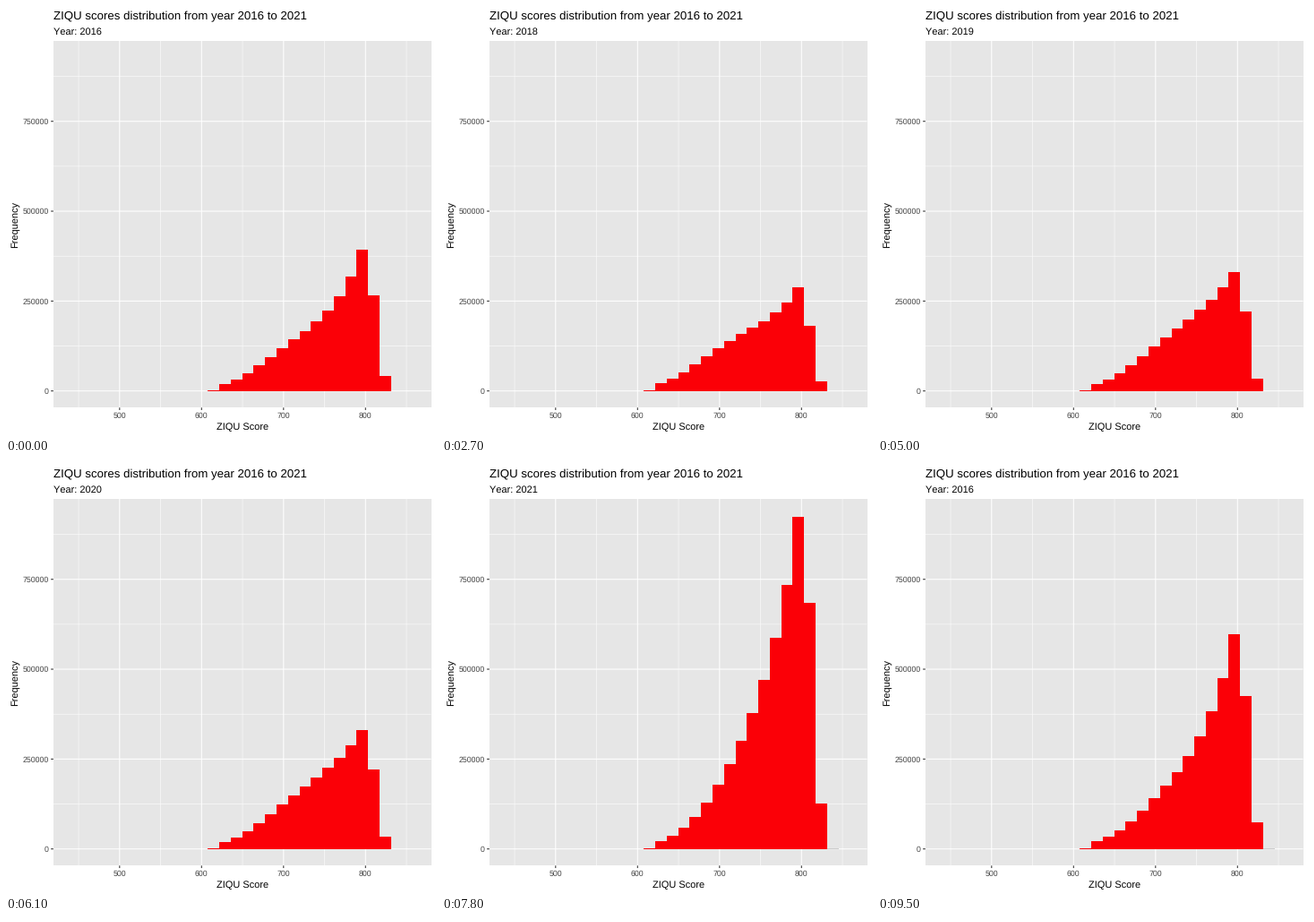
Animation of 480x480 px, one loop 10 s. Source, as a matplotlib script:

```python
import matplotlib.pyplot as plt
import numpy as np
from matplotlib.animation import FuncAnimation
from matplotlib.patches import Rectangle

SIZE, DPI = 480, 72
STEP = 100                 # ms per frame
LOOP = 10000               # ms
HOLD = 1700                # ms per year
LEFT, RIGHT, TOP, BOTTOM = 52.9, 474.5, 38.9, 448.3
ZERO = 430
EDGES = np.round(225.35 + 12.78 * np.arange(18))

# Per year: plateau height, extra height at the peak, decay per bin
# going left from the peak
YEARS = {
    2016: (60, 100, 0.70),
    2017: (64, 53, 0.70),
    2018: (60, 38, 0.70),
    2019: (54, 80, 0.80),
    2020: (50, 325, 0.77),
    2021: (58, 184, 0.74),
}

plt.rcParams.update({
    "font.family": "Liberation Sans",
    "text.hinting": "none",
    "text.hinting_factor": 8,
    "text.kerning_factor": 6,
})


def bar_heights(plateau, spike, decay):
    """Logistic rise times a peak that decays to the left, then a steep drop."""
    i = np.arange(1, 14)
    onset = 1 / (1 + np.exp((4.4 - i) / 1.85))
    rise = onset * (plateau + spike * decay ** (13 - i))
    peak = plateau + spike
    share = spike / peak
    drop = peak * np.array([0.5 + 0.27 * share, 0.04 + 0.11 * share])
    return np.round(np.concatenate([[1], rise, drop]))


def x_pos(score):
    return 126.8 + (score - 500) * 0.915


def y_pos(count):
    return 429.7 - count / 250000 * 100.33


fig = plt.figure(figsize=(SIZE / DPI, SIZE / DPI), dpi=DPI, facecolor="white")
ax = fig.add_axes([0, 0, 1, 1])
ax.set(xlim=(0, SIZE), ylim=(SIZE, 0))
ax.axis("off")


def line(xs, ys, color, width):
    ax.plot(xs, ys, color=color, lw=width, solid_capstyle="butt",
            snap=False, zorder=1)


def label(x, y, text, size, color="black", **kw):
    return ax.text(x, y, text, fontsize=size, color=color,
                   va="baseline", **kw)


ax.add_patch(Rectangle((LEFT, TOP), RIGHT - LEFT, BOTTOM - TOP,
                       fc="#e6e6e6", lw=0, zorder=0))

for score in range(450, 851, 50):
    major = score % 100 == 0
    x = x_pos(score)
    line([x, x], [TOP, BOTTOM], "white", 1.07 if major else 0.53)
    if major:
        line([x, x], [BOTTOM, BOTTOM + 2.75], "#333333", 1.07)
        label(x, 460, str(score), 8.8, "#444444", ha="center")

for count in range(0, 875001, 125000):
    major = count % 250000 == 0
    y = y_pos(count)
    line([LEFT, RIGHT], [y, y], "white", 1.07 if major else 0.53)
    if major:
        line([LEFT - 2.75, LEFT], [y, y], "#333333", 1.07)
        label(47.7, y + 3.2, str(count), 8.8, "#444444", ha="right")

label(LEFT, 15, "ZIQU scores distribution from year 2016 to 2021", 13.2)
subtitle = label(LEFT, 32, "", 11)
label((LEFT + RIGHT) / 2, 473, "ZIQU Score", 11, ha="center")
label(13.2, (TOP + BOTTOM) / 2, "Frequency", 11, rotation=90,
      rotation_mode="anchor", ha="center")

bars = ax.stairs(np.full(16, ZERO), EDGES[:17], baseline=ZERO, fill=True,
                 color="#fb0007", lw=0, antialiased=False, zorder=3)
sliver = ax.add_patch(Rectangle((EDGES[16], ZERO - 1), EDGES[17] - EDGES[16],
                                1, fc="#cccccc", lw=0, zorder=3))


def draw(i):
    t = i * STEP
    named = 2016 + (t + 700) // HOLD % 6    # title runs ahead of the bars
    shown = 2016 + (t + 100) // HOLD
    subtitle.set_text(f"Year: {named}")
    bars.set_data(values=ZERO - bar_heights(*YEARS[shown]))
    sliver.set_visible(shown >= 2020)
    return subtitle, bars, sliver


anim = FuncAnimation(fig, draw, frames=LOOP // STEP, interval=STEP,
                     repeat=True, repeat_delay=0)
plt.show()
```
